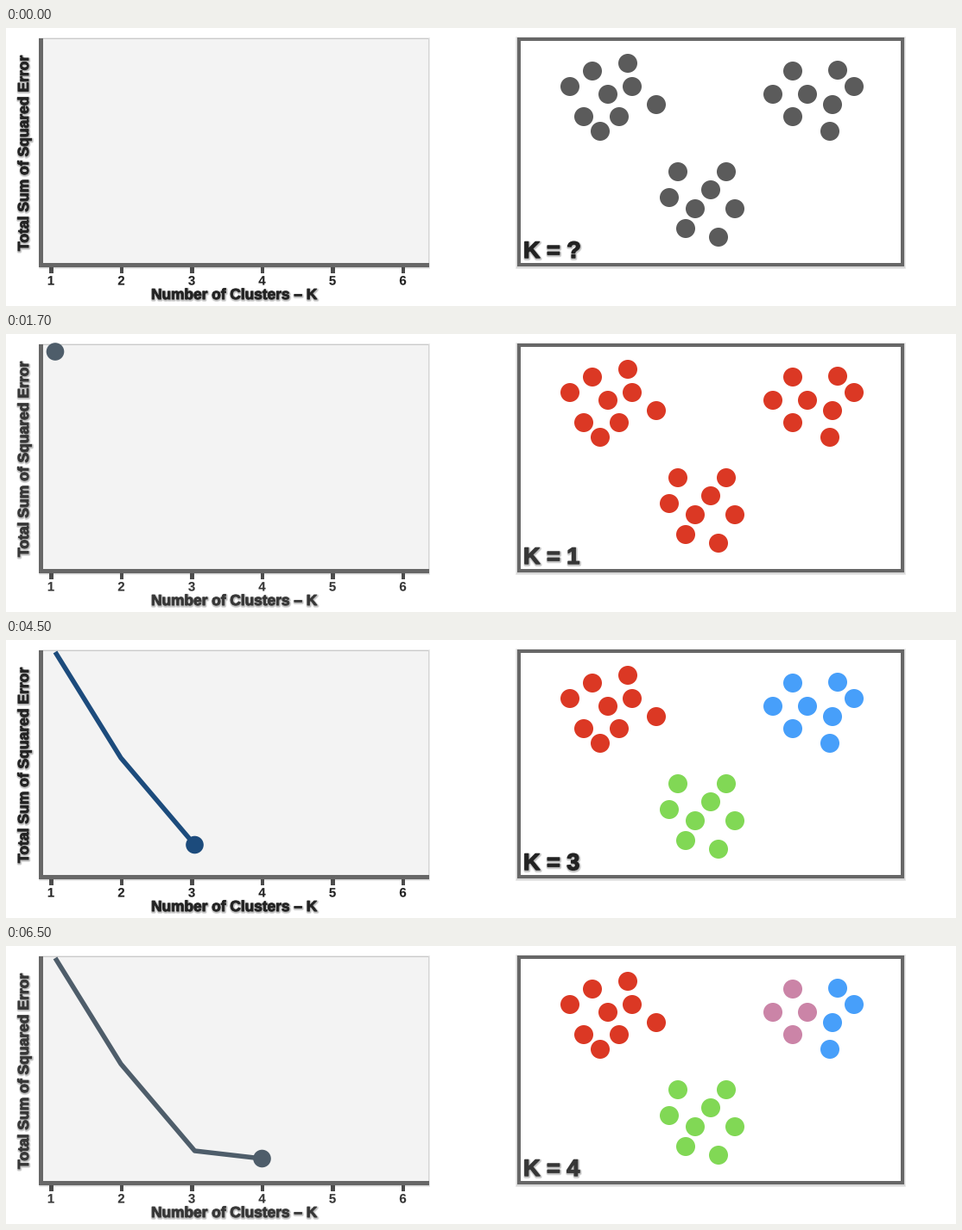
Animation of 1100x323 px, one loop 8000 ms. Source, as a matplotlib script:

```python
import numpy as np
import matplotlib.pyplot as plt
from matplotlib.animation import FuncAnimation
from matplotlib.patches import Circle, Rectangle
from matplotlib.patheffects import Stroke

WIDTH, HEIGHT, DPI = 1100, 323, 64
PX = 72 / DPI  # points per pixel
FRAMES, INTERVAL = 16, 500
STEP = 4  # frames per value of K

GREY, FRAME = "#5b5b5b", "#676767"
CLUSTER_COLORS = ["#db3824", "#479ffa", "#81d855", "#cb84a7"]
INK, SOFT_INK = "#222222", "#363636"
NAVY, SLATE = "#1c4b7c", "#4e5d6a"

# Three loose clouds of samples, and where each new cluster centre starts
SAMPLES = np.array([
    (720, 41), (679, 50), (653, 68), (725, 68), (697, 77),
    (753, 89), (669, 103), (710, 103), (688, 120),
    (911, 50), (888, 77), (928, 77), (911, 103),
    (963, 49), (982, 68), (957, 89), (954, 120),
    (778, 167), (768, 197), (798, 210), (787, 233),
    (834, 167), (816, 188), (844, 210), (825, 243),
])
SEEDS = np.array([(700, 80), (910, 80), (805, 200), (880, 80)], float)
ELBOW = np.array([(57, 14), (133, 137), (218.5, 238), (296.5, 247)])


def k_means(k, rounds=10):
    """Cluster number of every sample."""
    centres = SEEDS[:k]
    for _ in range(rounds):
        gaps = np.linalg.norm(SAMPLES[:, None] - centres, axis=2)
        owner = gaps.argmin(axis=1)
        centres = np.array([SAMPLES[owner == c].mean(axis=0) for c in range(k)])
    return owner


fig = plt.figure(figsize=(WIDTH / DPI, HEIGHT / DPI), dpi=DPI, facecolor="white")
ax = fig.add_axes([0, 0, 1, 1])
ax.set(xlim=(0, WIDTH), ylim=(HEIGHT, 0))
ax.axis("off")


def box(x0, y0, x1, y1, color, alpha=1, z=1):
    ax.add_patch(Rectangle((x0, y0), x1 - x0, y1 - y0, lw=0,
                           fc=color, alpha=alpha, zorder=z))


def soft_box(x0, y0, x1, y1, color):
    """Filled box with a faint shadow falling below it."""
    for grow in (2, 1):
        box(x0 - grow, y0 - grow + 1, x1 + grow, y1 + grow + 1, "black", 0.08)
    box(x0, y0, x1, y1, color, z=2)


def lettering(x, y, text, size, weight=0.1, **kwargs):
    label = ax.text(x, y, text, family="Liberation Sans", weight="bold",
                    size=size * PX, rotation_mode="anchor", zorder=6, **kwargs)
    label.stroke = weight * PX
    return label


def ink_label(label, ink):
    effects = [Stroke(linewidth=label.stroke, foreground=ink)]
    if label.stroke > 0.5:
        effects = [Stroke(offset=(0.6, -1.2), linewidth=label.stroke + grow * PX,
                          foreground="black", alpha=0.12)
                   for grow in (3, 1.5)] + effects
    label.set(color=ink, path_effects=effects)


# Chart
soft_box(40, 12, 489, 277, "#f3f3f3")
box(40, 11.5, 489, 12.5, "#c9c9c9", z=3)
box(488.5, 12, 489.5, 275, "#d4d4d4", z=3)
box(38, 12, 43, 278, FRAME, z=4)
box(38, 273, 489.5, 278, FRAME, z=4)
labels = []
for n in range(6):
    x = 52 + 81.5 * n
    box(x - 2, 277, x + 2.5, 284.5, "#4c4c4c", z=3)
    labels.append(lettering(x, 298.5, str(n + 1), 15, ha="center"))
labels += [
    lettering(168, 315, "Number of Clusters \N{EN DASH} K", 17.3, 0.9),
    lettering(26, 259, "Total Sum of Squared Error", 17.5, 0.9, rotation=90),
]

# Cluster panel
soft_box(592, 11, 1039.5, 276.5, FRAME)
box(596, 15, 1035.5, 272.5, "white", z=3)
k_label = lettering(599, 267, "", 27, 1.3)
labels.append(k_label)

dots = [ax.add_patch(Circle(p, 11, lw=0, zorder=5)) for p in SAMPLES]
curve, = ax.plot([], [], lw=5.5 * PX, solid_capstyle="butt",
                 solid_joinstyle="round", zorder=5)
marker = ax.add_patch(Circle((0, 0), 10.3, lw=0, zorder=6))


def update(frame):
    k = (frame + STEP - 1) // STEP
    colors = [CLUSTER_COLORS[c] for c in k_means(k)] if k else [GREY] * len(dots)
    for dot, color in zip(dots, colors):
        dot.set_facecolor(color)

    faded = k in (1, 4)
    k_label.set_text(f"K = {k or '?'}")
    for label in labels:
        ink_label(label, SOFT_INK if faded else INK)

    line_color = SLATE if faded else NAVY
    curve.set_data(*ELBOW[:k].T)
    curve.set_color(line_color)
    marker.set_visible(k > 0)
    marker.set_facecolor(line_color)
    x, y = ELBOW[max(k, 1) - 1]
    marker.set_center((x, max(y, 20.5)))  # stays inside the chart
    return [curve, marker, *dots, *labels]


anim = FuncAnimation(fig, update, frames=FRAMES, interval=INTERVAL,
                     repeat=True, repeat_delay=0, blit=False)
plt.show()
```
